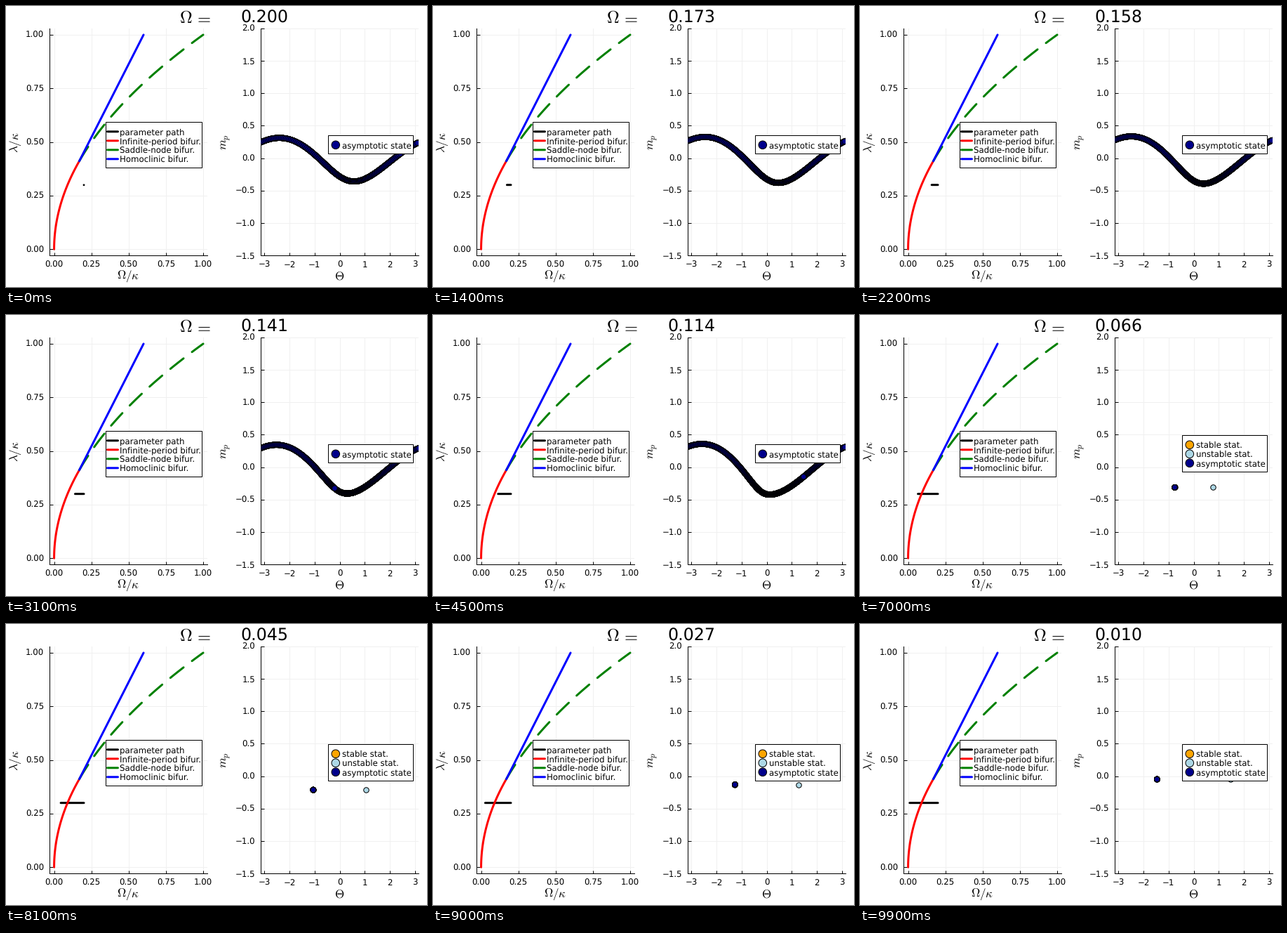
These frames come from a looping animation (600x400 px, 10 s). A matplotlib script:

```python
import numpy as np
import matplotlib.pyplot as plt
from matplotlib.animation import FuncAnimation
from matplotlib.patches import Circle, Rectangle

W, H = 600, 400
PX = 0.72  # points per pixel at 100 dpi
FRAMES = 100
LAM = 0.3
OMEGA = np.linspace(0.2, 0.01, FRAMES)
FONT, TITLE, LABEL = 11.75, 23.7, 17

plt.rcParams.update({"font.family": "DejaVu Sans", "mathtext.fontset": "cm",
                     "text.hinting": "none"})


def simulate(dt=0.25, steps=4000, keep=2560):
    """Driven, damped phase dynamics for every Omega at once (RK4)."""
    def rate(s):
        theta, m = s
        return np.array([OMEGA + LAM * m / np.sqrt(2),
                         -0.25 * (m + np.sqrt(2) * LAM * np.cos(theta))])

    s = np.array([np.full(FRAMES, -1.0), np.full(FRAMES, -0.2)])
    out = []
    for i in range(steps):
        k1 = rate(s)
        k2 = rate(s + dt / 2 * k1)
        k3 = rate(s + dt / 2 * k2)
        k4 = rate(s + dt * k3)
        s = s + dt / 6 * (k1 + 2 * k2 + 2 * k3 + k4)
        if i >= steps - keep:
            out.append(s)
    orbit = np.array(out)
    orbit[:, 0] = (orbit[:, 0] + np.pi) % (2 * np.pi) - np.pi
    return orbit


orbit = simulate()

fig = plt.figure(figsize=(W / 100, H / 100), dpi=100, facecolor="white")

# Overlay in pixel coordinates, y pointing down
top = fig.add_axes([0, 0, 1, 1], zorder=5)
top.set(xlim=(0, W), ylim=(H, 0))
top.axis("off")


def label(x, y, s, size=FONT, ha="left", rot=0):
    return top.text(x, y, s, size=size * PX, ha=ha, va="baseline",
                    rotation=rot, rotation_mode="anchor", zorder=4)


def panel(x0, x1, xlim, ylim, xticks, yticks, xfmt, yfmt):
    y0, y1 = 31.8, 355.4
    ax = fig.add_axes([x0 / W, 1 - y1 / H, (x1 - x0) / W, (y1 - y0) / H])
    ax.set(xlim=xlim, ylim=ylim, xticks=xticks, yticks=yticks)
    ax.set_axisbelow(True)
    ax.grid(color="#f0f0f0", lw=PX)
    ax.tick_params(direction="in", length=4.5 * PX, width=PX,
                   labelbottom=False, labelleft=False)
    for side, spine in ax.spines.items():
        spine.set_linewidth(PX)
        spine.set_visible(side in ("left", "bottom"))
    for v in xticks:
        px = x0 + (v - xlim[0]) / (xlim[1] - xlim[0]) * (x1 - x0)
        label(px, 372, format(v, xfmt).replace("-", "\u2212"), ha="center")
    for v in yticks:
        py = y1 - (v - ylim[0]) / (ylim[1] - ylim[0]) * (y1 - y0)
        label(x0 - 8, py + 4.3, format(v, yfmt).replace("-", "\u2212"),
              ha="right")
    return ax


quarter = np.linspace(0, 1, 5)
left = panel(62.2, 287.4, (-0.03, 1.03), (-0.03, 1.03),
             quarter, quarter, ".2f", ".2f")
right = panel(363.1, 588, (-np.pi, np.pi), (-1.5, 2),
              range(-3, 4), np.arange(-1.5, 2.1, 0.5), "d", ".1f")

label(174, 389, r"$\Omega/\kappa$", LABEL, "center")
label(17.8, 194.5, r"$\lambda/\kappa$", LABEL, "center", 90)
label(475.5, 391, r"$\Theta$", LABEL, "center")
label(313.3, 193.5, r"$m_p$", LABEL, "center", 90)
label(256, 24, r"$\Omega$", 24.5, "center")
label(280.3, 24, r"$=$", 24.5, "center")
value = label(334, 24, "", TITLE)

# Bifurcation diagram
thick = dict(lw=3 * PX, solid_capstyle="round", snap=False)
path, = left.plot([], [], color="black", zorder=3, **thick)
dot = top.add_patch(Circle((111, 254.8), 1.4, fc="black", lw=0))
lam = np.linspace(0, 0.411, 80)
left.plot(lam**2, lam, color="red", zorder=3.1, **thick)
lam = np.linspace(0.411, 1, 120)
left.plot(lam**2, lam, color="green", zorder=3.2, dashes=(8, 5),
          dash_capstyle="round", **thick)
left.plot([0.169, 0.6], [0.411, 1], color="blue", zorder=3.3, **thick)


def frame_box(x0, y0, x1, y1):
    return top.add_patch(Rectangle((x0, y0), x1 - x0, y1 - y0, fc="white",
                                   ec="black", lw=PX, zorder=2))


frame_box(142, 165, 279, 230)
entries = [("parameter path", "black"), ("Infinite-period bifur.", "red"),
           ("Saddle-node bifur.", "green"), ("Homoclinic bifur.", "blue")]
for i, (name, color) in enumerate(entries):
    y = 178.8 + 13 * i
    top.plot([144.5, 159.5], [y, y], color=color, zorder=3, **thick)
    label(161.6, y + 4.3, name)


# Phase portrait
def legend(y, names):
    n = len(names)
    parts = [frame_box(459, y - 14, 580, y - 1 + 13 * n)]
    for i, (name, color) in enumerate(names):
        cy = y + 13 * i
        parts.append(top.add_patch(Circle((469.8, cy - 0.2), 5.8, fc=color,
                                          ec="black", lw=PX, zorder=3)))
        parts.append(label(479, cy + 4.2, name))
    return parts


def show(parts, on):
    for p in parts:
        p.set_visible(on)


STATES = [("stable stat.", "orange"), ("unstable stat.", "lightblue"),
          ("asymptotic state", "darkblue")]
running = legend(198, STATES[2:])
locked = legend(185, STATES)

AREA = (7.5 * PX) ** 2
stable, unstable, asym = (
    right.scatter([], [], s=AREA, c=color, edgecolors="black",
                  linewidths=PX, zorder=3 + i, snap=False)
    for i, (_, color) in enumerate(STATES))


def update(i):
    om = OMEGA[i]
    value.set_text(f"{om:.3f}")
    path.set_data([0.2, om], [LAM, LAM])
    path.set_visible(i > 0)
    dot.set_visible(i == 0)

    fixed = om <= LAM**2
    show(running, not fixed)
    show(locked + [stable, unstable], fixed)
    if fixed:
        th, m = np.arccos(om / LAM**2), -np.sqrt(2) * om / LAM
        stable.set_offsets([[-th, m]])
        unstable.set_offsets([[th, m]])
    pts = orbit[-40:, :, i] if fixed else orbit[:, :, i]
    asym.set_offsets(pts)
    # One size per point keeps the markers off the pixel grid
    asym.set_sizes(np.full(len(pts), AREA))
    return []


anim = FuncAnimation(fig, update, frames=FRAMES, interval=100,
                     init_func=lambda: [], repeat=True, repeat_delay=0)
plt.show()
```
